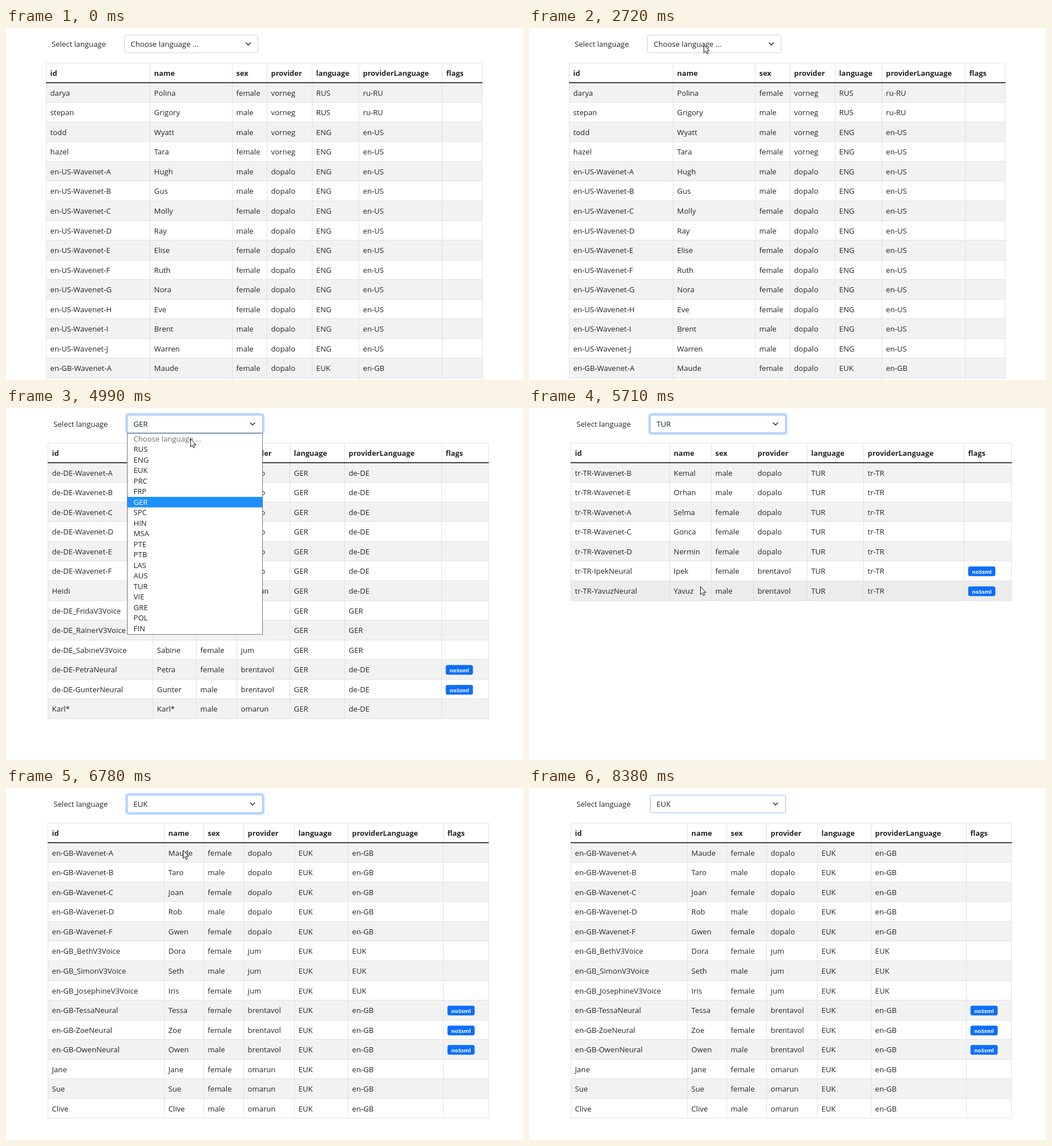
An HTML page that plays this animation: 906x618 px, repeating every 8.43 s.

```html
<!DOCTYPE html>
<html lang="en">
<head>
<meta charset="utf-8">
<title>Voice list</title>
<style>
html, body { margin: 0; width: 100%; height: 100%; overflow: hidden; background: #fff; }
svg { display: block; width: 100vw; height: 100vh; }
text { font: 13.1px "Open Sans", "Noto Sans", sans-serif; fill: #212529; white-space: pre; }
.head { font-weight: 700; font-size: 12.8px; }
.badge { font-weight: 700; font-size: 9.5px; fill: #fff; text-anchor: middle; }
</style>
</head>
<body>
<svg id="stage" viewBox="0 0 906 618"></svg>
<script>
const LOOP = 8430, ROW = 34.53, ITEM = 18.5, PAD = 7.6;
const HEADS = ['id', 'name', 'sex', 'provider', 'language', 'providerLanguage', 'flags'];
const SEX = { f: 'female', m: 'male' };
const PROVIDERS = { v: 'vorneg', d: 'dopalo', o: 'omarun', j: 'jum', b: 'brentavol' };
const CHOOSE = 'Choose language ...';
const ITEMS = [CHOOSE, ...'RUS ENG EUK PRC FRP GER SPC HIN MSA PTE PTB LAS AUS TUR VIE GRE POL FIN'.split(' ')];

// Row: id name sex provider; "~X" is a Wavenet voice, leading "-" or "_" takes the locale prefix.
const TABLES = [
  { cols: [70, 252, 396, 457, 536, 618, 764, 834], groups: [
    ['RUS', 'ru-RU', 'darya Polina f v,stepan Grigory m v'],
    ['ENG', 'en-US', 'todd Wyatt m v,hazel Tara f v,~A Hugh m d,~B Gus m d,~C Molly f d,~D Ray m d,' +
      '~E Elise f d,~F Ruth f d,~G Nora f d,~H Eve f d,~I Brent m d,~J Warren m d'],
    ['EUK', 'en-GB', '~A Maude f d,~B Taro m d']] },
  { cols: [73, 257, 333, 404, 497, 593, 763, 845], groups: [
    ['GER', 'de-DE', '~A Inge f d,~B Stefan m d,~C Gabi f d,~D Heiko m d,~E Kurt m d,~F Elke f d,' +
      'Heidi Heidi f o,_FridaV3Voice Frida f j,_RainerV3Voice Rainer m j,_SabineV3Voice Sabine f j,' +
      '-PetraNeural Petra f b,-GunterNeural Gunter m b,Karl* Karl* m o']] },
  { cols: [73, 246, 319, 393, 487, 586, 762, 845], groups: [
    ['TUR', 'tr-TR', '~B Kemal m d,~E Orhan m d,~A Selma f d,~C Gonca f d,~D Nermin f d,' +
      '-IpekNeural Ipek f b,-YavuzNeural Yavuz m b']] },
  { cols: [73, 277, 346, 416, 505, 599, 766, 845], groups: [
    ['EUK', 'en-GB', '~A Maude f d,~B Taro m d,~C Joan f d,~D Rob m d,~F Gwen f d,_BethV3Voice Dora f j,' +
      '_SimonV3Voice Seth m j,_JosephineV3Voice Iris f j,-TessaNeural Tessa f b,-ZoeNeural Zoe f b,' +
      '-OwenNeural Owen m b,Jane Jane f o,Sue Sue f o,Clive Clive m o']] }
];

// [time, table on show]
const SWAPS = [[0, 0], [3140, 1], [5350, 2], [6740, 3]];
// [time, value in the select box]
const VALUES = [[0, 0], [3100, 6], [5310, 14], [6700, 3]];
// [list opens, list closes, rows react to the pointer again]
const OPEN = [[2790, 3100, 4060], [4860, 5310, 5710], [6160, 6700, 6990]];
// [time, x, y] of the pointer tip
const PATH = [
  [1730, 15, 600], [1900, 125, 460], [2090, 250, 330], [2240, 250, 330], [2600, 306, 29], [2810, 306, 29],
  [3050, 269, 170], [4060, 269, 170], [4400, 322, 28], [4880, 322, 28], [4990, 323, 53],
  [5300, 300, 313], [5710, 300, 313], [6040, 321, 52], [6110, 322, 30], [6220, 322, 30],
  [6490, 310, 109], [6930, 310, 109], [7140, 246, 353], [7330, 205, 500], [7490, 190, 578]];

const stage = document.getElementById('stage');

function add(parent, tag, attrs, content) {
  const el = document.createElementNS('http://www.w3.org/2000/svg', tag);
  for (const k in attrs) el.setAttribute(k, attrs[k]);
  if (content !== undefined) el.textContent = content;
  return parent.appendChild(el);
}
const box = (p, x, y, width, height, fill, more) => add(p, 'rect', { x, y, width, height, fill, ...more });
const label = (p, x, y, s, more) => add(p, 'text', { x, y, ...more }, s);
const set = (el, attrs) => { for (const k in attrs) el.setAttribute(k, attrs[k]); };
const show = (el, on) => { el.style.display = on ? '' : 'none'; };
const rowTop = i => Math.round(95.8 + ROW * i);

function cells([lang, locale, list]) {
  return list.split(',').map(line => {
    const [raw, name, sex, who] = line.split(' ');
    const id = raw[0] === '~' ? locale + '-Wavenet-' + raw[1] : /^[-_]/.test(raw) ? locale + raw : raw;
    return [id, name, SEX[sex], PROVIDERS[who], lang, who === 'j' ? lang : locale, who === 'b'];
  });
}

function buildTable({ cols, groups }) {
  const g = add(stage, 'g', {});
  const rows = groups.flatMap(cells);
  const left = cols[0], right = cols[7], bottom = rowTop(rows.length);
  const line = '#dee2e6';
  const bands = rows.map((r, i) =>
    box(g, left, rowTop(i), right - left, rowTop(i + 1) - rowTop(i), '#fff'));
  box(g, left, 61, right - left + 1, 1, line);
  rows.forEach((r, i) => box(g, left, rowTop(i + 1), right - left + 1, 1, line));
  cols.forEach(x => box(g, x, 61, 1, bottom - 60, line));
  box(g, left, 95.2, right - left + 1, 1.7, '#212529');
  HEADS.forEach((h, c) => label(g, cols[c] + PAD, 83.5, h, { class: 'head' }));
  rows.forEach((r, i) => {
    const y = rowTop(i);
    for (let c = 0; c < 6; c++) label(g, cols[c] + PAD, y + 22.8, r[c]);
    if (r[6]) {
      box(g, cols[6] + PAD, y + 10.2, 47.7, 17, '#0d6efd', { rx: 3.4 });
      label(g, cols[6] + PAD + 23.9, y + 22.6, 'noSsml', { class: 'badge' });
    }
  });
  return { g, bands, cols };
}

const tables = TABLES.map(buildTable);

const caption = label(stage, 80, 33, 'Select language');
const ring = box(stage, 0, 8.8, 0, 38.4, '#c2dbfe', { rx: 6 });
const field = box(stage, 0, 12.5, 0, 31, '#fff', { rx: 3.4 });
const value = label(stage, 0, 33, '');
const chevron = add(stage, 'path', {
  d: 'M-3.8-1.9L0 1.9 3.8-1.9', fill: 'none', stroke: '#343a40', 'stroke-width': 1.5,
  'stroke-linecap': 'round', 'stroke-linejoin': 'round' });

const list = add(stage, 'g', {});
const frame = box(list, 0, 44.5, 0, 353, '#fff', { stroke: '#767676' });
const mark = box(list, 0, 0, 0, ITEM, '#1e90ff');
const options = ITEMS.map((s, i) => label(list, 0, 58.8 + ITEM * i, s));

const pointer = add(stage, 'path', {
  d: 'M.5.5V14.6L3.6 11.7 5.6 16.2 7.8 15.2 5.8 10.8H10.2Z',
  fill: '#fff', stroke: '#111', 'stroke-width': 1, 'stroke-linejoin': 'round' });

const latest = (steps, t) => steps.filter(s => s[0] <= t).pop()[1];

// Speed at a path point; zero next to a pause or at the ends.
function slope(i, k) {
  const a = PATH[i - 1], b = PATH[i], c = PATH[i + 1];
  if (!a || !c) return 0;
  const same = (p, q) => p[1] === q[1] && p[2] === q[2];
  return same(a, b) || same(b, c) ? 0 : (c[k] - a[k]) / (c[0] - a[0]);
}

function pointerAt(t) {
  if (t < PATH[0][0] || t >= PATH[PATH.length - 1][0]) return null;
  const i = PATH.findIndex(p => p[0] > t) - 1;
  const a = PATH[i], b = PATH[i + 1], d = b[0] - a[0], u = (t - a[0]) / d, v = 1 - u;
  return [1, 2].map(k =>
    a[k] * (1 + 2 * u) * v * v + b[k] * u * u * (3 - 2 * u) +
    slope(i, k) * d * u * v * v - slope(i + 1, k) * d * u * u * v);
}

function drawSelect(t, wide, chosen) {
  const x = wide ? 212.5 : 207.5, w = wide ? 237 : 234;
  const focus = t >= 8380 ? 0.05 : Math.max(0, Math.min(1, (t - 2790) / 150));
  set(caption, { x: wide ? 83.3 : 80 });
  set(ring, { x: x - 3.7, width: w + 7.4, opacity: focus });
  set(field, { x, width: w, stroke: t >= 8380 ? '#98bef9' : focus > 0.3 ? '#86b7fe' : '#ced4da' });
  set(value, { x: x + 11 });
  value.textContent = ITEMS[chosen];
  set(chevron, { transform: `translate(${wide ? 432 : 424.5} 28)` });
  return { x, w };
}

function drawList(open, at, chosen, { x, w }) {
  show(list, open);
  if (!open) return;
  const over = at ? Math.floor((at[1] - 45) / ITEM) : 0;
  const lit = over > 0 && over < ITEMS.length ? over : chosen;
  set(frame, { x, width: w });
  set(mark, { x: x + 0.5, width: w - 1, y: 45 + ITEM * lit });
  show(mark, lit > 0);
  options.forEach((o, i) => {
    o.setAttribute('x', x + 11);
    o.style.fill = i === 0 ? '#6d6d6d' : i === lit ? '#fff' : '#212529';
  });
}

function render(t) {
  const current = latest(SWAPS, t), chosen = latest(VALUES, t);
  const open = OPEN.some(([from, to]) => t >= from && t < to);
  const still = OPEN.some(([from, , moved]) => t >= from && t < moved);
  const at = pointerAt(t);
  tables.forEach(({ g, bands, cols }, n) => {
    show(g, n === current);
    if (n !== current) return;
    bands.forEach((band, i) => {
      const hot = at && !still && at[0] >= cols[0] && at[0] < cols[7] &&
        at[1] >= rowTop(i) && at[1] < rowTop(i + 1);
      band.setAttribute('fill', hot ? '#ececec' : i % 2 ? '#fff' : '#f2f2f2');
    });
  });
  drawList(open, at, chosen, drawSelect(t, current > 0, chosen));
  show(pointer, at);
  if (at) set(pointer, { transform: `translate(${at[0].toFixed(1)} ${at[1].toFixed(1)})` });
}

const start = performance.now();
function tick() {
  render((performance.now() - start) % LOOP);
  requestAnimationFrame(tick);
}
tick();
</script>
</body>
</html>
```
